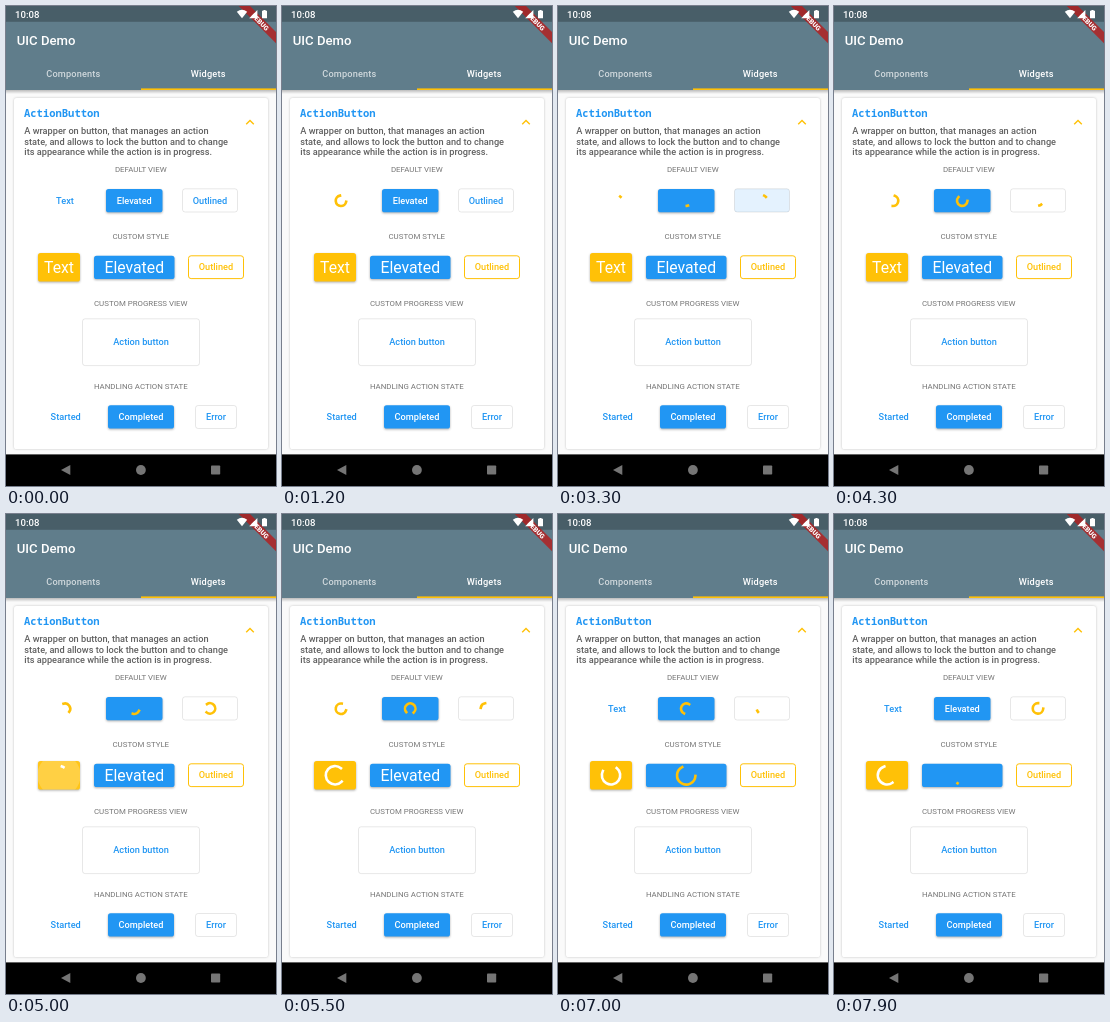
Animation, 270 px wide and 480 px high, one loop 8000 ms. Source, as an HTML page:

```html
<!DOCTYPE html>
<html lang="en">
<head>
<meta charset="utf-8">
<title>Action button demo</title>
<style>
  html, body { margin: 0; width: 100%; height: 100%; overflow: hidden; background: #fafafa; }
  svg { display: block; width: 100vw; height: 100vh; }
  text { font: 500 9.2px Roboto, sans-serif; }
  .mid { text-anchor: middle; }
  .cap { font-size: 7.88px; font-weight: 400; fill: #757575; }
  .big { font-size: 15.77px; font-weight: 400; }
  .blue { fill: #2196f3; }
  .amber { fill: #ffc107; }
  .white { fill: #fff; }
  .raised { filter: drop-shadow(0 1px 1px rgba(0, 0, 0, .32)); }
  .line { fill: none; stroke: rgba(0, 0, 0, .12); stroke-width: .8; }
  .line.gold { stroke: #ffc107; stroke-width: 1; }
  .spin { fill: none; stroke-width: 2.63; stroke-linecap: square; }
</style>
</head>
<body>
<svg id="stage" viewBox="0 0 270 480" preserveAspectRatio="none">
  <defs>
    <linearGradient id="shade" x2="0" y2="1">
      <stop stop-color="#000" stop-opacity=".25"/>
      <stop offset="1" stop-color="#000" stop-opacity="0"/>
    </linearGradient>
  </defs>
  <rect width="270" height="480" fill="#fafafa"/>

  <rect x="8" y="92" width="254" height="351" rx="2.6" fill="#fff"
        style="filter:drop-shadow(0 .6px .9px rgba(0,0,0,.22))"/>
  <text x="18" y="111" class="blue" style="font:600 10.5px 'Noto Sans Mono',monospace">ActionButton</text>
  <g fill="#616161">
    <text x="18.3" y="128.2">A wrapper on button, that manages an action</text>
    <text x="18.3" y="138.7">state, and allows to lock the button and to change</text>
    <text x="18.3" y="149.2">its appearance while the action is in progress.</text>
  </g>
  <path d="M240.2 118.2L244 114.4L247.8 118.2" fill="none" stroke="#ffc107" stroke-width="1.4"/>
  <g class="mid">
    <text x="134.8" y="165.9" class="cap">DEFAULT VIEW</text>
    <text x="134.8" y="232.9" class="cap">CUSTOM STYLE</text>
    <text x="134.8" y="299.9" class="cap">CUSTOM PROGRESS VIEW</text>
    <text x="134.8" y="382.9" class="cap">HANDLING ACTION STATE</text>
  </g>
  <g id="buttons"></g>

  <rect y="84" width="270" height="4" fill="url(#shade)"/>
  <rect width="270" height="84" fill="#607d8b"/>
  <rect width="270" height="15.8" fill="#000" opacity=".25"/>
  <text x="10.8" y="39.2" class="white" style="font-size:13.14px">UIC Demo</text>
  <g class="mid white" letter-spacing=".16">
    <text x="67.4" y="71.4" opacity=".7">Components</text>
    <text x="202.2" y="71.4">Widgets</text>
  </g>
  <rect x="135" y="82.4" width="135" height="1.6" class="amber"/>

  <g transform="translate(270 0) rotate(45)">
    <rect x="-26.3" y="18.4" width="52.6" height="7.9" fill="#b71c1c" opacity=".8"/>
    <text y="24.8" class="mid white" style="font-size:6.7px;font-weight:900">DEBUG</text>
  </g>
  <g class="white">
    <text x="9" y="12" style="font-size:9.6px">10:08</text>
    <path d="M230.8 5.8Q236 1.8 241.2 5.8L236 12.2Z"/>
    <path d="M251.4 4V12.2H243.2Z"/>
    <path d="M256 4.8H257.4V4H259.6V4.8H261V12.2H256Z"/>
  </g>

  <rect y="448.4" width="270" height="31.6" fill="#000"/>
  <g fill="#757575">
    <path d="M64.3 458.9V469.1L55 464Z"/>
    <circle cx="134.9" cy="464" r="4.9"/>
    <rect x="205" y="459.4" width="9.2" height="9.2" rx=".8"/>
  </g>
</svg>
<script>
const LOOP = 8000, STEP = 100, BUSY = 5000, PATH = 1333, TURN = 2222;
const BLUE = '#2196f3', AMBER = '#ffc107';

// box: x, y, w, h; start: time of the tap; r: spinner radius
const buttons = [
  { label: 'Text', kind: 'text', box: [38, 183, 42, 23.5], start: 760, r: 5.25 },
  { label: 'Elevated', kind: 'fill', box: [100, 183, 56.5, 23.3], start: 2150, r: 5.25 },
  { label: 'Outlined', kind: 'line', box: [176.5, 182.8, 55, 23.2], start: 3190, r: 5.25 },
  { label: 'Text', kind: 'fill', color: AMBER, big: true, box: [32, 247, 42, 28.5], start: 4920, r: 9.2, spin: '#fff' },
  { label: 'Elevated', kind: 'fill', big: true, box: [88, 249.7, 80.5, 23.3], start: 6590, r: 9.2 },
  { label: 'Outlined', kind: 'line', color: AMBER, box: [182.5, 249.8, 55, 22.8] },
  { label: 'Action button', kind: 'line', box: [76.5, 312.8, 117, 46.8] },
  { label: 'Started', kind: 'text', box: [38, 399, 43.4, 23.5] },
  { label: 'Completed', kind: 'fill', box: [102, 399.2, 66, 23.3] },
  { label: 'Error', kind: 'line', box: [189.5, 399.5, 41, 23] }
];

const clamp = v => Math.min(1, Math.max(0, v));

function add(parent, tag, attrs) {
  const node = document.createElementNS('http://www.w3.org/2000/svg', tag);
  for (const key in attrs) node.setAttribute(key, attrs[key]);
  return parent.appendChild(node);
}

function build(b, i) {
  const g = add(document.getElementById('buttons'), 'g', {});
  const [x, y, width, height] = b.box;
  const frame = { x, y, width, height, rx: 2.6 };
  const color = b.color || BLUE, filled = b.kind === 'fill';
  b.cx = x + width / 2;
  b.cy = y + height / 2;
  if (filled) add(g, 'rect', { ...frame, fill: color, class: 'raised' });
  if (b.start) {
    const tint = filled ? '#fff' : BLUE, power = filled ? 2 : 1;
    add(add(g, 'clipPath', { id: 'clip' + i }), 'rect', frame);
    b.ink = add(g, 'g', { 'clip-path': `url(#clip${i})`, fill: tint });
    add(b.ink, 'rect', { ...frame, opacity: .04 * power });
    b.drop = add(b.ink, 'circle', { cx: b.cx, cy: b.cy, opacity: .1 * power });
  }
  if (b.kind === 'line') add(g, 'rect', { ...frame, class: b.color ? 'line gold' : 'line' });
  b.text = add(g, 'text', {
    x: b.cx, y: b.cy + (b.big ? 5.6 : 3.2),
    class: b.big ? 'mid big' : 'mid', fill: filled ? '#fff' : color
  });
  b.text.textContent = b.label;
  if (b.start) b.arc = add(g, 'path', { class: 'spin', stroke: b.spin || AMBER });
}

// cubic-bezier(.4, 0, .2, 1)
function ease(x) {
  let lo = 0, hi = 1;
  for (let i = 0; i < 20; i++) {
    const s = (lo + hi) / 2, q = 1 - s;
    if (1.2 * s * q * q + .6 * s * s * q + s * s * s < x) lo = s; else hi = s;
  }
  return lo * lo * (3 - 2 * lo);
}

function arcPath(b, u) {
  const p = u % PATH / PATH;
  const head = ease(clamp(p * 2)), tail = ease(clamp(p * 2 - 1));
  const from = Math.PI * (-.5 + 1.5 * tail + .5 * p + 2 * u / TURN);
  const sweep = Math.max(1.5 * Math.PI * (head - tail), .01);
  const at = a => `${(b.cx + b.r * Math.cos(a)).toFixed(3)} ${(b.cy + b.r * Math.sin(a)).toFixed(3)}`;
  return `M${at(from)}A${b.r} ${b.r} 0 ${sweep > Math.PI ? 1 : 0} 1 ${at(from + sweep)}`;
}

function draw(t) {
  for (const b of buttons) {
    if (!b.start) continue;
    const u = t - b.start, busy = u >= 0 && u < BUSY;
    b.text.style.display = busy ? 'none' : '';
    b.arc.style.display = busy ? '' : 'none';
    if (busy) b.arc.setAttribute('d', arcPath(b, u));
    const shown = busy ? 1 - clamp((u - 60) / 375) : 0;
    b.ink.setAttribute('opacity', shown);
    b.drop.setAttribute('r', b.box[2] * .68 * clamp((u + 90) / 225));
  }
}

function tick() {
  const t = performance.now() % LOOP;
  draw(Math.floor(t / STEP) * STEP);
  requestAnimationFrame(tick);
}

buttons.forEach(build);
tick();
</script>
</body>
</html>
```
